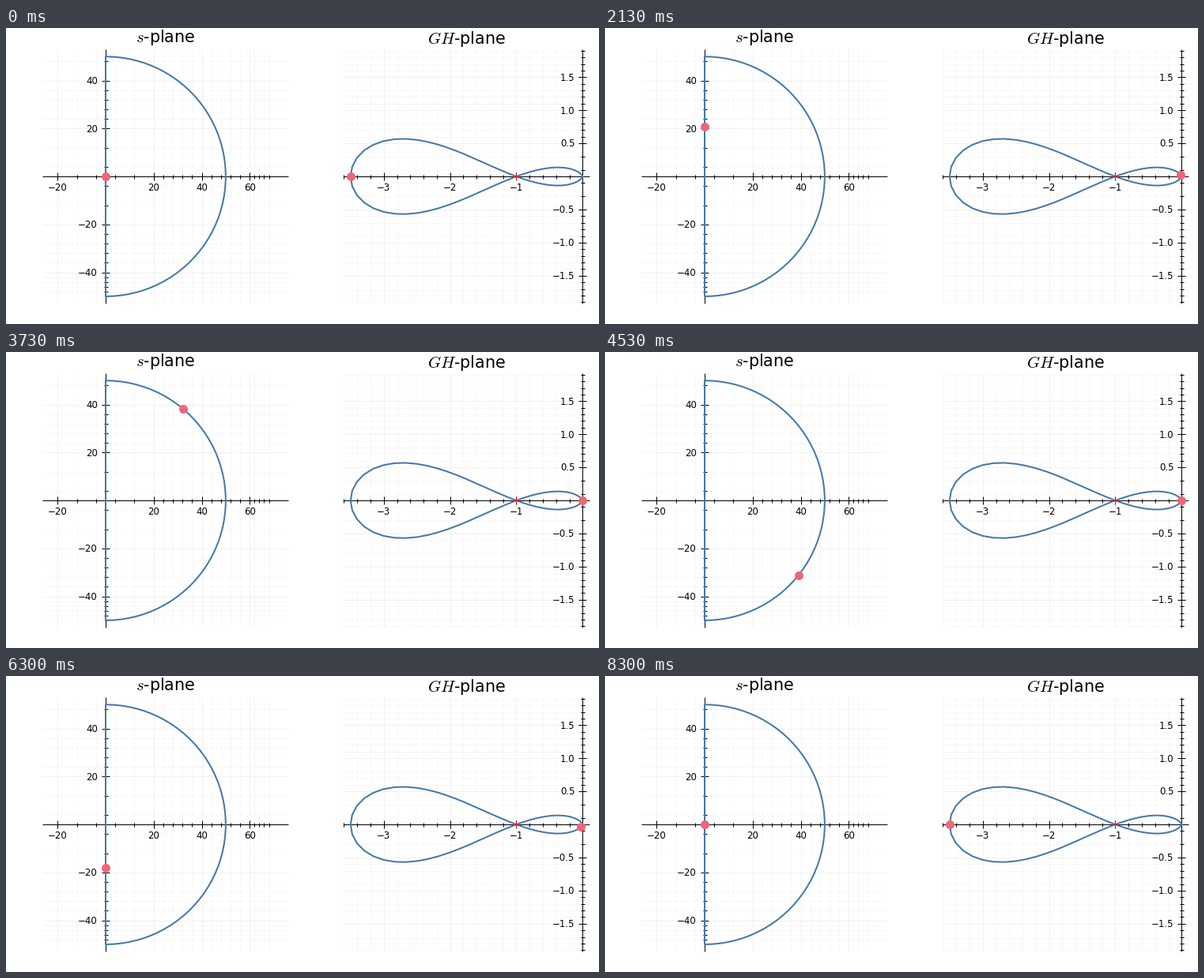
Recreate the animation shown at these times as a matplotlib script. Size 750x375 px, loop 8330 ms.

```python
import numpy as np
import matplotlib.pyplot as plt
from matplotlib.animation import FuncAnimation

W, H, DPI = 750, 375, 100
PX = 72 / DPI                      # points per pixel
BLUE, PINK = "#4477AA", "#EE6677"
FRAMES, LOOP = 250, 8330

plt.rcParams["font.family"] = "DejaVu Sans"
plt.rcParams["mathtext.fontset"] = "cm"

fig = plt.figure(figsize=(W / DPI, H / DPI), dpi=DPI, facecolor="white")
ax = fig.add_axes([0, 0, 1, 1])
ax.set_xlim(0, W)
ax.set_ylim(H, 0)
ax.axis("off")


def contour():
    """Right half-plane contour, 250 samples, denser near the origin."""
    w = np.r_[np.linspace(0, 10, 50), np.linspace(10, 50, 50)]
    arc = 50 * np.exp(1j * np.linspace(np.pi / 2, -np.pi / 2, 50))
    return np.r_[1j * w, arc, -1j * w[::-1]]


def loop_gain(s):
    return 336 / ((s - 2) * (s + 6) * (s + 8))


def minor_ticks(major, lo, hi):
    """Four ticks per gap, with one extra gap scaled on at each end."""
    ratio = (major[2] - major[1]) / (major[1] - major[0])
    first = major[0] - (major[1] - major[0]) / ratio
    last = major[-1] + (major[-1] - major[-2]) * ratio
    edges = np.r_[first, major, last]
    ticks = np.concatenate([np.linspace(a, b, 6)[1:-1]
                            for a, b in zip(edges, edges[1:])])
    return ticks[(ticks >= lo - 1e-9) & (ticks <= hi + 1e-9)]


class Plane:
    def __init__(self, origin, scale, xlim, ylim):
        self.origin, self.scale = origin, scale
        self.xlim, self.ylim = xlim, ylim

    def px(self, x):
        return self.origin[0] + self.scale * np.asarray(x)

    def py(self, y):
        return self.origin[1] - self.scale * np.asarray(y)

    def lines(self, xs, ys, half=None, **style):
        """Grid lines, or tick marks of the given half length."""
        x0, y0 = self.origin
        if half is None:
            (left, right), (bottom, top) = self.px(self.xlim), self.py(self.ylim)
        else:
            left, right, bottom, top = x0 - half, x0 + half, y0 + half, y0 - half
        ax.vlines(self.px(xs), top, bottom, **style)
        ax.hlines(self.py(ys), left, right, **style)

    def axes(self, xs, ys, fmt):
        x0, y0 = self.origin
        mx, my = minor_ticks(xs, *self.xlim), minor_ticks(ys, *self.ylim)
        self.lines(mx, my, color="black", alpha=0.05, lw=0.5 * PX, zorder=1)
        self.lines(xs, ys, color="black", alpha=0.1, lw=0.5 * PX, zorder=1)
        ink = dict(color="black", lw=PX, zorder=2)
        self.lines([0], [0], **ink)
        self.lines(mx, my, half=2.5, **ink)
        self.lines(xs, ys, half=5, **ink)
        font = dict(fontsize=11.8 * PX, va="baseline", zorder=2)
        for x in xs:
            ax.text(self.px(x), y0 + 17.4, label(x, "g"), ha="center", **font)
        for y in ys:
            ax.text(x0 - 10, self.py(y) + 4.3, label(y, fmt), ha="right", **font)

    def title(self, text, baseline):
        ax.text(self.px(sum(self.xlim) / 2), baseline, text, ha="center",
                va="baseline", fontsize=20.7 * PX)

    def curve(self, z):
        ax.plot(self.px(z.real), self.py(z.imag), color=BLUE, lw=2 * PX,
                solid_joinstyle="round", zorder=3)

    def dot(self):
        return ax.plot([], [], "o", color=PINK, ms=11 * PX, mew=0, zorder=5)[0]

    def move(self, dot, z):
        dot.set_data([self.px(z.real)], [self.py(z.imag)])


def label(v, fmt):
    return format(v, fmt).replace("-", "\u2212")


s = contour()
gh = loop_gain(s)

s_plane = Plane((126, 188.1), 3.0377, (-26.2, 76.2), (-53, 53))
s_plane.axes([-20, 20, 40, 60], [-40, -20, 20, 40], "g")
s_plane.title("$s$-plane", 18)
s_plane.curve(s)

g_plane = Plane((729.3, 188.1), 83.85, (-3.605, 0.105), (-1.92, 1.92))
g_plane.axes([-3, -2, -1], [-1.5, -1, -0.5, 0.5, 1, 1.5], ".1f")
g_plane.title("$GH$-plane", 20.5)
g_plane.curve(gh)
ax.plot(g_plane.px(-1), g_plane.py(0), "+", color="red", ms=7 * PX,
        mew=PX, zorder=4)

s_dot, g_dot = s_plane.dot(), g_plane.dot()


def update(i):
    s_plane.move(s_dot, s[i])
    g_plane.move(g_dot, gh[i])
    return s_dot, g_dot


anim = FuncAnimation(fig, update, frames=FRAMES, interval=LOOP / FRAMES,
                     repeat=True, repeat_delay=0, blit=False)
plt.show()
```
